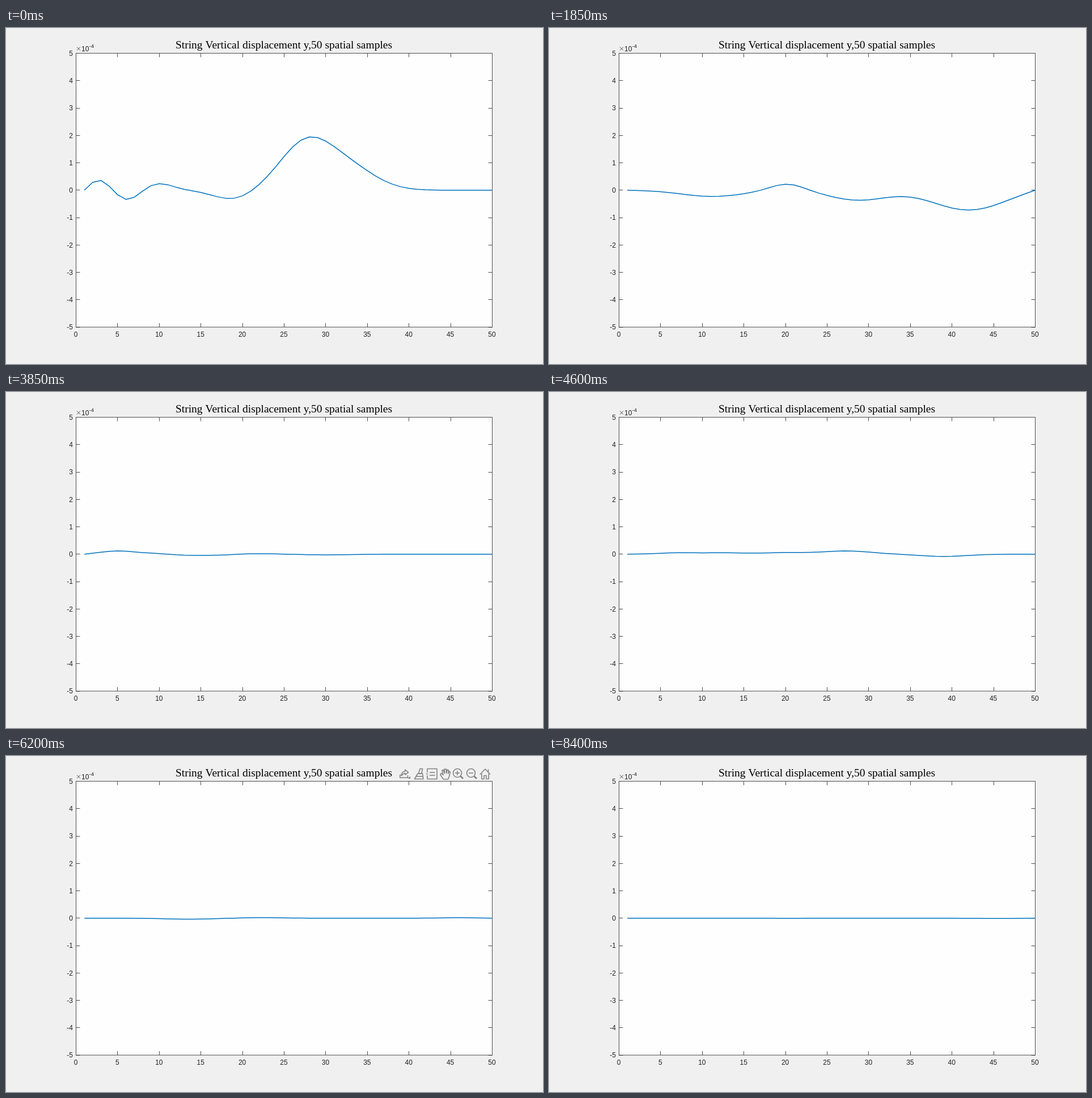
These frames come from a looping animation (947x592 px, 8.45 s). An HTML page with a canvas:

```html
<!DOCTYPE html>
<html lang="en">
<head>
<meta charset="utf-8">
<title>String displacement</title>
<style>
  html, body { margin: 0; width: 100%; height: 100%; overflow: hidden; background: #f0f0f0; }
  canvas { display: block; }
</style>
</head>
<body>
<canvas id="stage" width="947" height="592"></canvas>
<script>
const ctx = document.getElementById('stage').getContext('2d');
const LOOP = 8450, HOLD = 500, STEP = 50;
const BOX = { left: 123.5, top: 44.5, right: 857.5, bottom: 527 };
const LENGTH = 49, LAP = 2 * LENGTH;
const DECAY = 0.033, SPEED = 8.15;
const SANS = '"Liberation Sans", Arial, sans-serif';
const ZERO_Y = (BOX.top + BOX.bottom) / 2;
const xAt = v => BOX.left + v * (BOX.right - BOX.left) / 50;
const yAt = v => ZERO_Y - v * (BOX.bottom - BOX.top) / 10;

const mod = (a, n) => ((a % n) + n) % n;
const pulse = (center, height, width) => ({ center, height, width });

// The string's wave disperses through these shapes, each a sum of bell curves.
// at: step number, travel: distance run so far, dir: direction along the string.
const shapes = [
  { at: 0, travel: 0, dir: 1, pulses: [
    pulse(1.8, 19, 1.8), pulse(5.2, -18, 2), pulse(8.9, 12, 2.4),
    pulse(17.8, -16, 3.3), pulse(26.6, 82, 4.4), pulse(31.8, 37, 4.6)] },
  { at: 28, travel: 226, dir: -1, pulses: [
    pulse(10.2, -11, 5.3), pulse(19.2, 12, 2.8),
    pulse(27.7, -17.5, 4.9), pulse(41, -35, 6)] },
  { at: 54, travel: 452, dir: -1, pulses: [
    pulse(3.3, 5, 3), pulse(11, -12.5, 2.8), pulse(15.3, -8, 3.2),
    pulse(24, 7, 3), pulse(30.5, 11, 5.5), pulse(43.5, -3.6, 4.5)] },
  { at: 83, travel: 685, dir: 1, pulses: [
    pulse(6, 2.4, 3), pulse(11.5, 2.4, 3.5), pulse(19, 2.7, 4),
    pulse(26.4, 5.7, 4), pulse(38, -4, 4)] },
  { at: 115, travel: 941, dir: -1, pulses: [
    pulse(12.5, -1.8, 4), pulse(21.5, 1, 3.5), pulse(45, 0.9, 3)] }
];

// A wave runs round a lap of twice the string length; the way back is upside down.
function wave({ dir, pulses }, s) {
  return pulses.reduce((sum, { center, height, width }) => {
    const distance = mod(s - dir * center + LENGTH, LAP) - LENGTH;
    return sum + dir * height * Math.exp(-((distance / width) ** 2));
  }, 0);
}

function displacement(n) {
  const k = shapes.findLastIndex(shape => n >= shape.at);
  const a = shapes[k], b = shapes[k + 1];
  const u = b ? (n - a.at) / (b.at - a.at) : 0;
  const moved = b ? u * (b.travel - a.travel) : SPEED * (n - a.at);
  const part = (shape, weight, shift) =>
    s => weight * Math.exp(-DECAY * (n - shape.at)) * wave(shape, s - shift);
  const fading = part(a, 1 - u, moved);
  const rising = b ? part(b, u, a.travel + moved - b.travel) : () => 0;
  const total = s => fading(s) + rising(s);
  return s => total(s) - total(-s);
}

function path(points, close) {
  ctx.beginPath();
  points.forEach(([x, y]) => ctx.lineTo(x, y));
  if (close) ctx.closePath();
}

function line(...points) {
  path(points);
  ctx.stroke();
}

function label(text, x, y, font, align) {
  ctx.font = font;
  ctx.textAlign = align;
  ctx.fillText(text, x, y);
}

function drawAxes() {
  const { left, top, right, bottom } = BOX;
  ctx.fillStyle = '#f0f0f0';
  ctx.fillRect(0, 0, 947, 592);
  ctx.fillStyle = '#fefefe';
  ctx.fillRect(left, top, right - left, bottom - top);
  ctx.strokeStyle = '#4c4c4c';
  ctx.lineWidth = 1;
  ctx.lineJoin = 'miter';
  ctx.strokeRect(left, top, right - left, bottom - top);
  ctx.fillStyle = '#222';
  for (let v = 0; v <= 50; v += 5) {
    const x = Math.floor(xAt(v)) + 0.5;
    line([x, top], [x, top + 7]);
    line([x, bottom], [x, bottom - 7]);
    label(v, xAt(v) - 0.5, 543.5, '12px ' + SANS, 'center');
  }
  for (let v = -5; v <= 5; v++) {
    const y = Math.floor(yAt(v)) + 0.5;
    line([left, y], [left + 7, y]);
    line([right, y], [right - 7, y]);
    label(v, 118, yAt(v) + 4.3, '12px ' + SANS, 'right');
  }
  line([125, 33.5], [131, 39.5]);
  line([131, 33.5], [125, 39.5]);
  label('10', 133, 41, '12px ' + SANS, 'left');
  label('-4', 146.5, 34.5, '9.6px ' + SANS, 'left');
  ctx.fillStyle = '#000';
  label('String Vertical displacement y,50 spatial samples', 490, 36,
    '19.5px "Liberation Serif", "Times New Roman", serif', 'center');
}

function drawString(n) {
  const y = displacement(n);
  ctx.strokeStyle = '#0072bd';
  ctx.lineWidth = 1.5;
  ctx.lineJoin = 'round';
  line(...Array.from({ length: 50 }, (_, i) => [xAt(i + 1), ZERO_Y - y(i)]));
}

function magnifier(x, plus) {
  ctx.beginPath();
  ctx.arc(x, 30, 7.5, 0, 2 * Math.PI);
  ctx.stroke();
  line([x - 4, 30], [x + 4, 30]);
  if (plus) line([x, 26], [x, 34]);
  ctx.lineWidth = 2.6;
  line([x + 5.5, 35.5], [x + 10, 40]);
  ctx.lineWidth = 1.6;
}

function drawToolbar() {
  ctx.strokeStyle = ctx.fillStyle = '#828282';
  ctx.lineWidth = 1.6;
  ctx.lineJoin = 'round';

  // export
  line([697, 33.5], [694.8, 33.5], [694.8, 38.2], [708.5, 38.2], [708.5, 34]);
  ctx.beginPath();
  ctx.moveTo(697.5, 35);
  ctx.quadraticCurveTo(697.5, 27, 704, 27);
  ctx.lineTo(704, 24);
  ctx.lineTo(709.5, 28.8);
  ctx.lineTo(704, 33);
  ctx.lineTo(704, 30.5);
  ctx.quadraticCurveTo(700, 30.5, 697.5, 35);
  ctx.stroke();
  path([[713, 35.5], [713, 40], [708.5, 40]], true);
  ctx.fill();

  // brush
  path([[730, 22.5], [734.5, 22.5], [733, 31], [727.5, 31]], true);
  ctx.stroke();
  path([[726, 31], [734.5, 31], [736, 40.5], [720.5, 40.5]], true);
  ctx.stroke();
  line([723.5, 36], [735, 36]);

  // data tip
  line([743, 29], [743, 22.5], [760, 22.5], [760, 40.5], [743, 40.5], [743, 34]);
  line([741, 31.5], [744, 31.5]);
  [29, 34].forEach(y => line([747, y], [756.5, y]));

  // hand
  path([[771.5, 41], [765.8, 33], [767.5, 30.5], [771, 33.5], [769, 25.5], [771.3, 24.5],
    [773.2, 30.5], [773.2, 23], [776, 23], [776.5, 30.5], [778, 24], [780.2, 24.8],
    [779.7, 31], [781.5, 27], [783.3, 28], [781.5, 36.5], [779.5, 41]], true);
  ctx.stroke();

  magnifier(796, true);
  magnifier(820, false);

  // home
  line([835.8, 32.5], [845, 23], [854.2, 32.5]);
  line([838.8, 31], [838.8, 40.5], [843, 40.5], [843, 34.5], [847, 34.5],
    [847, 40.5], [851.2, 40.5], [851.2, 31]);
  line([850.5, 28], [850.5, 23.5]);
}

function draw(now) {
  const t = mod(now, LOOP);
  const n = t < HOLD ? 0 : Math.floor((t - HOLD) / STEP) + 1;
  drawAxes();
  drawString(n);
  if (t >= 5150 && t < 6850) drawToolbar();
}

let start;
function tick(now) {
  start ??= now;
  draw(now - start);
  requestAnimationFrame(tick);
}
draw(0);
requestAnimationFrame(tick);
</script>
</body>
</html>
```
